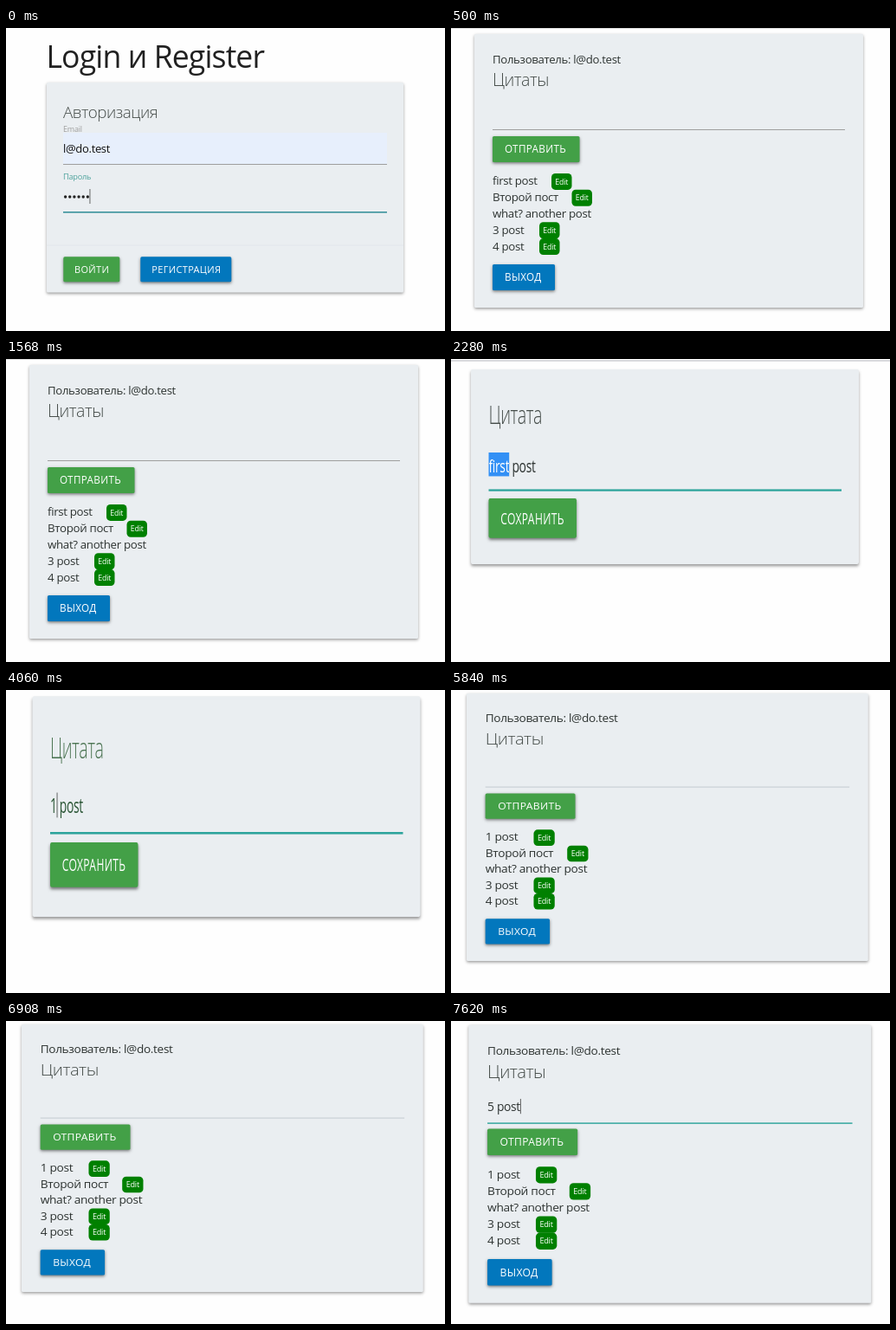
Animation, 507 px wide and 350 px high, one loop 8 s. Source, as an HTML page with a canvas:

```html
<!DOCTYPE html>
<html lang="ru">
<head>
<meta charset="utf-8">
<title>Login и Register</title>
<style>
  html, body { margin: 0; width: 100%; height: 100%; overflow: hidden; background: #fff; }
  canvas { display: block; width: 507px; height: 350px; }
</style>
</head>
<body>
<canvas id="stage"></canvas>
<script>
const W = 507, H = 350, LOOP = 8000;
const canvas = document.getElementById('stage');
const ctx = canvas.getContext('2d');
const dpr = window.devicePixelRatio || 1;
canvas.width = W * dpr;
canvas.height = H * dpr;

const FAMILY = '"Open Sans", "Noto Sans", sans-serif';
const INK = '#2d3331', HEAD = '#454c49', CARD = '#eaeef1', CARET = '#555';
const GREEN = '#43a047', BLUE = '#0277bd', TEAL = '#2ba39b', GREY = '#9e9e9e';
const EMAIL = 'l@do.test';

function text(str, x, y, size, color = INK, weight = 400, spacing = -0.025) {
  ctx.font = `${weight} ${size}px ${FAMILY}`;
  ctx.letterSpacing = `${size * spacing}px`;
  ctx.fillStyle = color;
  ctx.fillText(str, x, y);
  return ctx.measureText(str).width;
}

function rect(x, y, w, h, color) {
  ctx.fillStyle = color;
  ctx.fillRect(x, y, w, h);
}

function box(x, y, w, h, r, color) {
  ctx.fillStyle = color;
  ctx.beginPath();
  ctx.roundRect(x, y, w, h, r);
  ctx.fill();
}

// Canvas shadows ignore the transform, so the offset follows the zoom here.
function raised(x, y, w, h, color, alpha = 0.4) {
  ctx.save();
  ctx.shadowColor = `rgba(0,0,0,${alpha})`;
  ctx.shadowBlur = 3.5 * dpr;
  ctx.shadowOffsetY = 1.5 * ctx.getTransform().d;
  box(x, y, w, h, 1.6, color);
  ctx.restore();
}

function button(label, x, y, w, h, color, pad, size) {
  raised(x, y, w, h, color, 0.5);
  text(label, x + pad, y + h / 2 + size * 0.37, size, '#fff', 400, 0.03);
}

// Runs a view in coordinates local to its card, zoomed per axis.
function place(x, y, sx, sy, view) {
  ctx.save();
  ctx.translate(x, y);
  ctx.scale(sx, sy);
  view();
  ctx.restore();
}

function login() {
  text('Login и Register', 46.5, 46, 35.6, '#212121');
  raised(47, 63, 412, 242.5, CARD);
  text('Авторизация', 66, 103.5, 18.8, HEAD, 300);
  rect(66, 121, 374, 36, '#e7effc');
  text('Email', 66, 120, 9, GREY);
  text(EMAIL, 66, 144, 13, '#111');
  rect(66, 157, 374, 1, GREY);
  text('Пароль', 66, 175, 9.2, '#4fa39d');
  ctx.fillStyle = '#222';
  for (let i = 0; i < 6; i++) {
    ctx.beginPath();
    ctx.arc(68.6 + i * 5.15, 195, 1.7, 0, Math.PI * 2);
    ctx.fill();
  }
  rect(96.5, 186, 0.9, 17, CARET);
  rect(66, 212, 374, 1.6, '#3a929c');
  rect(47, 250.5, 412, 1, '#e4e8eb');
  button('ВОЙТИ', 66.3, 264.3, 65, 29, GREEN, 12.7, 11);
  button('РЕГИСТРАЦИЯ', 155.3, 264.3, 105, 29, BLUE, 13, 11);
}

function posts(first, badgeX, lineColor, draft) {
  raised(0, 0, 449, 316, CARD);
  text('Пользователь: ' + EMAIL, 21, 34, 13.2);
  text('Цитаты', 21, 60, 19.6, HEAD, 300);
  if (draft) {
    const w = text(draft, 21, 97.8, 13.4);
    rect(21 + w, 84, 0.9, 17, CARET);
    rect(21, 111, 407, 1.4, lineColor);
  } else {
    rect(21, 110, 407, 1, lineColor);
  }
  button('ОТПРАВИТЬ', 21, 118, 100.5, 30, GREEN, 14, 11.7);
  const rows = [[first, badgeX], ['Второй пост', 112.5], ['what? another post', 0],
                ['3 post', 75], ['4 post', 75]];
  rows.forEach(([label, x], i) => {
    const y = 174.3 + i * 18.8;
    text(label, 21, y, 13.3);
    if (!x) return;
    box(x, y - 13.4, 23.5, 19, 4.5, '#008000');
    text('Edit', x + 4.3, y - 0.8, 8.8, '#fff');
  });
  button('ВЫХОД', 21, 266, 72, 30, BLUE, 14, 11.7);
}

function edit(value, selected, caret, ink = INK, head = HEAD) {
  raised(0, 0, 448, 150, CARD);
  text('Цитата', 20.5, 42, 19.7, head, 300);
  const w = text(value, 20.5, 79.3, 13.9, ink);
  if (selected) {
    const part = ctx.measureText(selected).width;
    rect(20.5, 64, part, 18.3, '#3390f5');
    text(selected, 20.5, 79.3, 13.9, '#fff');
  }
  if (caret) {
    rect(20.5 + ctx.measureText(caret).width, 65.5, 0.9, 17, CARET);
  }
  rect(20.5, 92.3, 407.5, 1.5, TEAL);
  button('СОХРАНИТЬ', 20.5, 99.3, 101.5, 30.5, GREEN, 13.7, 12.1);
}

const scenes = [
  [0, login],
  [500, () => {
    rect(0, 0, W, 1, '#dcdcdc');
    place(27, 7, 1, 1, () => posts('first post', 89, GREY));
  }],
  [2280, () => {
    rect(0, 1, W, 2, '#d9dadd');
    place(23, 12, 1, 1.5, () => edit('first post', 'first'));
  }],
  [4060, () => place(30.5, 7.3, 1, 1.698, () => edit('1 post', '', '1', '#2a5535', '#4a7351'))],
  [5840, () => place(18, 4, 1.033, 0.978, () => posts('1 post', 75, '#c3c9d0'))],
  [7620, () => place(20.3, 4.5, 1.0356, 1.017, () => posts('1 post', 75, TEAL, '5 post'))]
];

function frame(now) {
  const t = now % LOOP;
  ctx.setTransform(dpr, 0, 0, dpr, 0, 0);
  rect(0, 0, W, H, '#fefefe');
  scenes.filter(([start]) => start <= t).pop()[1]();
  requestAnimationFrame(frame);
}
frame(performance.now());
</script>
</body>
</html>
```
